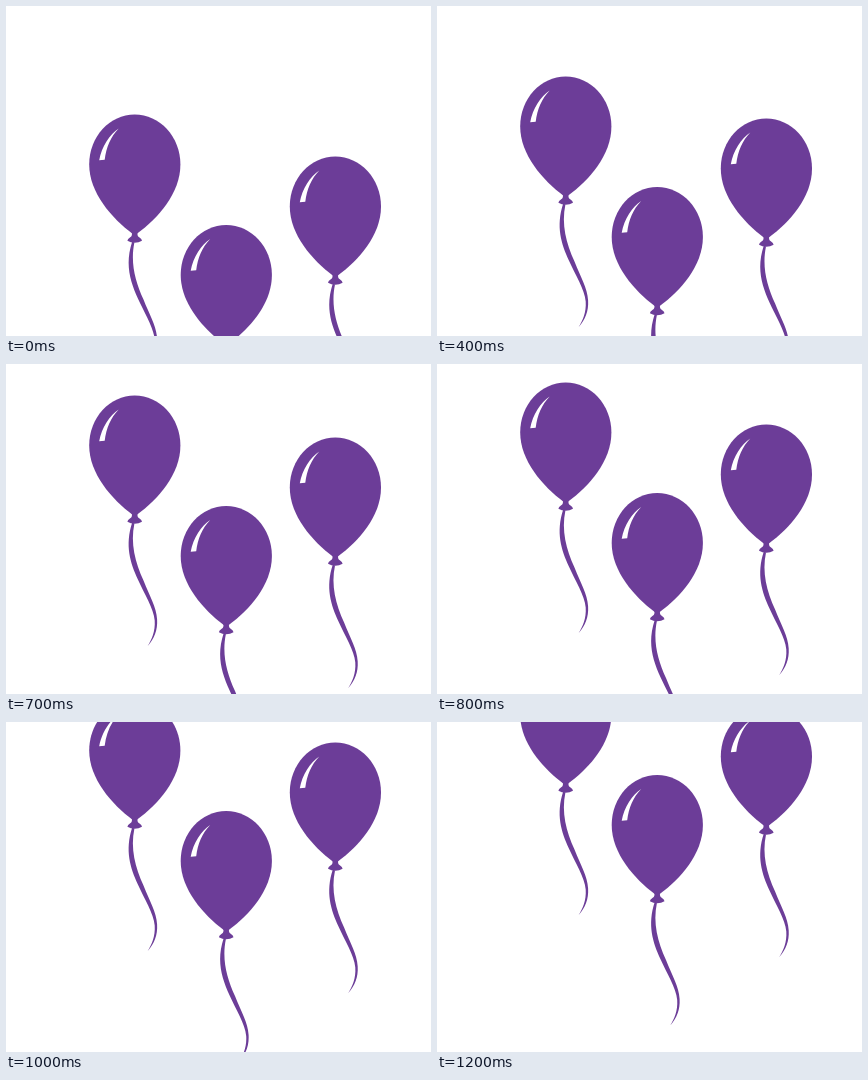
An HTML page that plays this animation: 425 px wide and 330 px high, repeating every 1.3 s.

```html
<!DOCTYPE html>
<html lang="en">
<head>
<meta charset="utf-8">
<title>Rising balloons</title>
<style>
  html, body { margin: 0; width: 100%; height: 100%; overflow: hidden; background: #fff; }
  svg { display: block; width: 425px; height: 330px; }
</style>
</head>
<body>
<svg viewBox="0 0 425 330">
  <defs>
    <!-- origin: top centre of the balloon -->
    <g id="balloon" fill="#6c3d98">
      <path d="M0 0C25 0 45.7 22 45.7 50C45.7 79 23 104 2.5 119L-2.5 119C-22.5 104 -45.5 78.5 -45.5 50C-45.5 22 -25 0 0 0Z"/>
      <path d="M-3 117.5H3Q2 121.5 4.5 122.8Q7.2 124.3 7.3 126.3Q4 128.2 0 128.2Q-4 128.2 -7.3 126.3Q-7.2 124.3 -4.5 122.8Q-2 121.5 -3 117.5Z"/>
      <path d="M-2.5 127C-10 150 -4.5 167 3.2 184C9.5 198 19 213 20 225C20.7 236 17 244 13 250.5C19.5 243 23 235 22.4 224C21.7 211 15 201 8.8 185C.5 167 -4.5 148 -.3 128Z"/>
      <path fill="#fff" d="M-16 14C-25 20 -33 32 -35.5 45.8L-30 45.2C-28.5 33 -24 22 -16 14Z"/>
    </g>
  </defs>
  <g id="flock">
    <use href="#balloon" x="128.7" y="108.5"/>
    <use href="#balloon" x="220.2" y="219"/>
    <use href="#balloon" x="329.3" y="150.5"/>
  </g>
</svg>
<script>
  const STEP = 100;
  const rise = [0, 7, 14, 26, 38, 51, 64, 77, 90, 110, 130, 148, 166];
  const flock = document.getElementById("flock");
  const start = performance.now();

  function draw() {
    const elapsed = Math.max(0, performance.now() - start);
    const step = Math.floor(elapsed / STEP) % rise.length;
    flock.setAttribute("transform", `translate(0 ${-rise[step]})`);
    requestAnimationFrame(draw);
  }
  draw();
</script>
</body>
</html>
```
